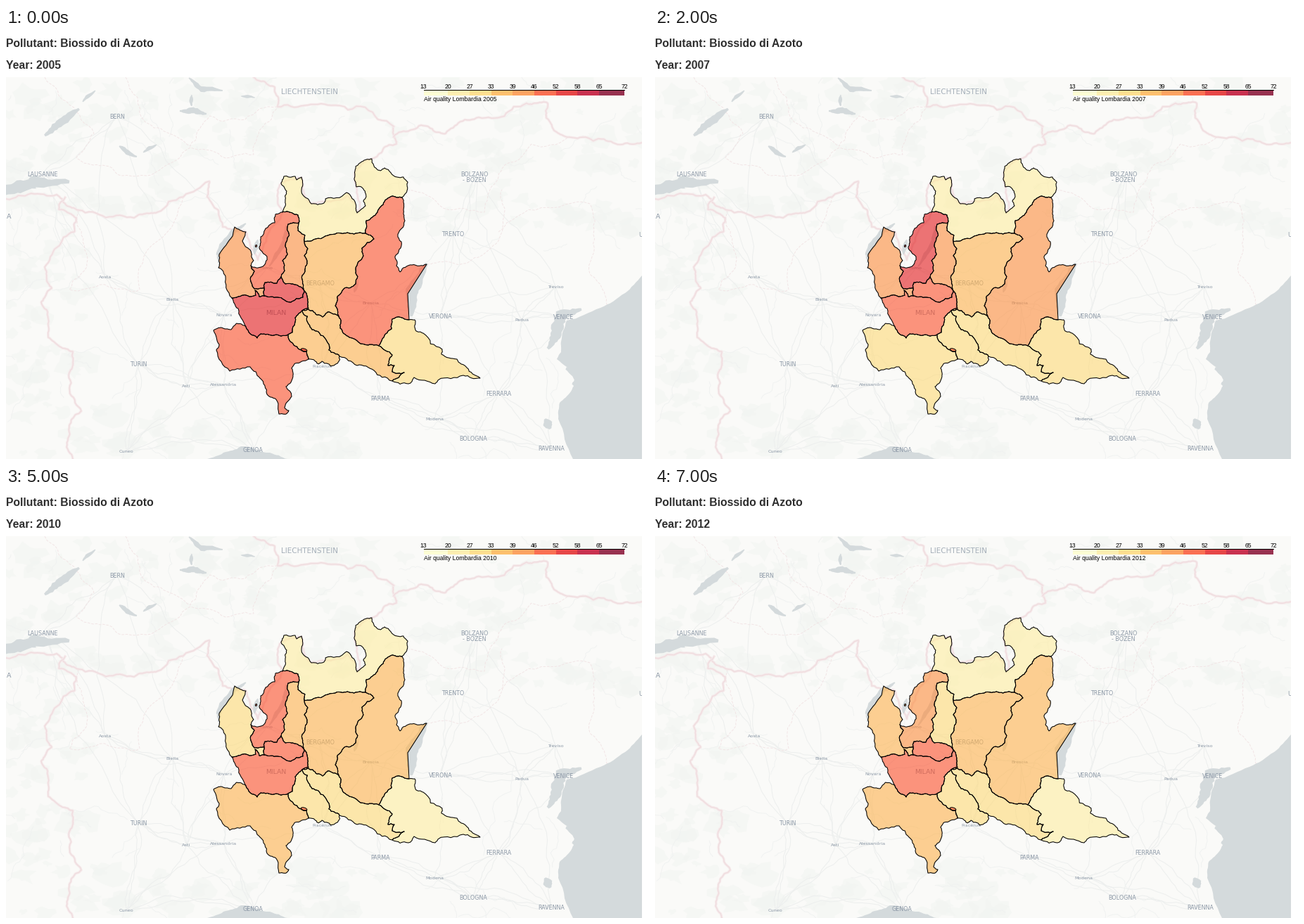
These frames come from a looping animation (914x613 px, 8 s). A matplotlib script:

```python
import numpy as np
import matplotlib.pyplot as plt
from matplotlib.animation import FuncAnimation
from matplotlib.patches import Ellipse, Polygon, Rectangle

W, H, TOP, RIGHT = 914, 613, 70, 904
PT = 0.72  # points per pixel at 100 dpi
WATER, BORDER, ROAD, LABEL = "#d4dadc", "#efdcde", "#edefee", "#8e9aa8"
YLORRD = ["#ffffcc", "#ffeda0", "#fed976", "#feb24c", "#fd8d3c",
          "#fc4e2a", "#e31a1c", "#bd0026", "#800026"]
rng = np.random.default_rng(12)

fig = plt.figure(figsize=(9.14, 6.13), dpi=100, facecolor="white")
ax = fig.add_axes([0, 0, RIGHT / W, (H - TOP) / H])
ax.set(xlim=(0, RIGHT), ylim=(H, TOP), xticks=[], yticks=[], facecolor="#fafaf8")
for side in ax.spines.values():
    side.set_visible(False)


def arc(*pts, amp=0.14, passes=3):
    """Polyline made ragged by midpoint displacement."""
    p = np.array(pts, float)
    for _ in range(passes):
        step = np.diff(p, axis=0)
        normal = np.column_stack([-step[:, 1], step[:, 0]])
        mid = p[:-1] + step / 2 + normal * rng.uniform(-amp, amp, (len(step), 1))
        out = np.empty((2 * len(p) - 1, 2))
        out[::2], out[1::2] = p, mid
        p = out
    return p


def back(a):
    return a[::-1]


def area(pts, color, z=1, **kw):
    return ax.add_patch(Polygon(pts, closed=True, fc=color, zorder=z, **kw))


def line(pts, color, width, z=2, **kw):
    ax.plot(pts[:, 0], pts[:, 1], color=color, lw=width * PT, zorder=z, **kw)


def label(x, y, text, size=8.0, **kw):
    style = dict(color=LABEL, family="DejaVu Sans", ha="center",
                 va="center_baseline", zorder=4, clip_on=True)
    style.update(kw)
    return ax.text(x, y, text, fontsize=size * PT, **style)


# ---- place names ----
cities = [(158, 126, "BERN"), (52, 207.5, "LAUSANNE"), (665.5, 208, "BOLZANO"),
          (635.5, 293, "TRENTO"), (618, 410, "VERONA"), (793, 410.5, "VENICE"),
          (188, 478, "TURIN"), (532, 527, "PARMA"), (700, 520, "FERRARA"),
          (664, 583.5, "BOLOGNA"), (775.5, 597.5, "RAVENNA"), (351, 599.5, "GENOA"),
          (446.5, 362.5, "BERGAMO")]
towns = [(141, 354, "Aosta"), (236.5, 386, "Biella"), (310, 408, "Novara"),
         (256.5, 509, "Asti"), (309.5, 507, "Alessandria"), (171, 602.5, "Cuneo"),
         (781, 368, "Treviso"), (733, 415.5, "Padua"), (609.5, 556, "Modena"),
         (449.5, 481, "Piacenza"), (370, 341, "Como"), (518, 391, "Brescia")]
for place in cities:
    label(*place)
for place in towns:
    label(*place, 6.5)
label(665.5, 216, "- BOZEN")
label(384, 404.5, "MILAN", 9.4)
label(431, 90, "LIECHTENSTEIN", 10.4, color="#a5afb9")
label(4, 267.5, "A", 9.5)
label(902, 293.5, "U")


# ---- relief and roads ----
def relief(x0, x1, y0, y1, n):
    a = np.linspace(0, 2 * np.pi, 14)[:-1]
    for _ in range(n):
        x, y = rng.uniform(x0, x1), rng.uniform(y0, y1)
        r = rng.uniform(4, 17) * rng.uniform(0.5, 1.3, a.size)
        shape = np.column_stack([x + r * np.cos(a) * 1.4, y + r * np.sin(a)])
        area(shape, "#f2f5f2", alpha=0.55, lw=0)


relief(0, 904, 70, 290, 190)
relief(0, 130, 290, 613, 45)
relief(130, 540, 540, 613, 45)

hubs = np.array([p[:2] for p in cities + towns])
for a in hubs:
    for j in np.argsort(np.hypot(*(hubs - a).T))[1:5]:
        line(arc(a, hubs[j], amp=0.1, passes=4), ROAD, 1)
for _ in range(95):
    a = rng.uniform((0, 70), (900, 613))
    if a[0] < 770 or a[1] < 340:
        line(arc(a, a + rng.normal(0, 42, 2), amp=0.2, passes=4), "#f0f2f1", 0.9)


# ---- state and region borders ----
def border(*pts):
    b = arc(*pts, passes=4)
    line(b, "#f6eaeb", 3.5)
    line(b, BORDER, 1.2)


def region(*pts):
    line(arc(*pts, passes=4), "#f2e4e5", 0.9, dashes=(4, 2))


border((0, 243), (72, 237), (103, 259), (182, 270), (215, 262), (289, 218),
       (286, 240), (308, 283), (341, 290), (358, 330), (393, 262), (391, 221),
       (420, 213), (434, 250), (486, 236), (500, 263), (496, 205), (520, 186),
       (555, 165), (551, 140))
border((84, 241), (75, 258), (100, 270), (97, 290), (55, 340), (65, 370), (50, 390),
       (60, 440), (95, 460), (90, 490), (107, 545), (90, 565), (95, 613))
border((551, 155), (600, 140), (625, 150), (672, 127), (740, 107), (770, 107),
       (768, 128), (790, 152), (850, 158), (904, 163))
border((352, 70), (382, 84), (386, 112), (462, 110), (551, 140))
region((55, 70), (125, 150), (100, 185), (165, 210), (262, 170), (352, 180), (386, 112))
region((170, 70), (195, 130), (262, 168), (290, 125), (386, 112))
region((570, 231), (680, 262), (705, 200), (800, 155))
region((598, 336), (650, 335), (705, 290), (705, 230))
region((700, 290), (830, 250), (830, 350), (855, 395))
region((103, 259), (115, 340), (90, 372), (190, 372), (252, 240))


# ---- water ----
def lake(width, *pts):
    """Lake as a ragged ribbon that narrows towards its ends."""
    p = arc(*pts, amp=0.06)
    d = np.gradient(p, axis=0)
    n = np.column_stack([-d[:, 1], d[:, 0]]) / np.hypot(*d.T)[:, None]
    t = np.linspace(0, np.pi, len(p))
    half = width / 2 * (0.25 + 0.75 * np.sin(t)) * rng.uniform(0.8, 1.2, len(p))
    area(np.vstack([p + n * half[:, None], back(p - n * half[:, None])]),
         WATER, z=3, lw=0)


lake(17, (-20, 234), (10, 229), (42, 218), (90, 219))
lake(11, (55, 153), (78, 134), (104, 115))
lake(5, (109, 105), (127, 89))
lake(7, (161, 168), (186, 183))
lake(5, (195, 177), (214, 166))
lake(8, (247, 118), (266, 117), (285, 122))
lake(5, (264, 95), (264, 111))
lake(7, (260, 71), (278, 87), (308, 89))
lake(4, (334, 97), (354, 99))
lake(8, (341, 278), (324, 288), (303, 318), (302, 334))
lake(6, (358, 301), (353, 322))
lake(7, (398, 281), (396, 305), (374, 339))
lake(5, (500, 358), (495, 376))
lake(17, (598, 335), (577, 374), (576, 410))
lake(16, (818, 400), (788, 409), (782, 435), (770, 456))
lake(15, (796, 484), (820, 499), (806, 508))
lake(12, (766, 556), (774, 570))

sea = arc((904, 352), (880, 377), (845, 398), (797, 416), (789, 446), (789, 461),
          (783, 471), (813, 494), (803, 517), (787, 533), (785, 556), (806, 613), amp=0.06)
area(np.vstack([sea, (904, 613)]), WATER, z=3, lw=0)
area(arc((286, 613), (309, 604), (334, 595), (375, 604), (400, 613), amp=0.08),
     WATER, z=3, lw=0)

# ---- province borders, one arc per shared stretch ----
so_out = arc((393, 262), (397, 246), (399, 232), (391, 221), (395, 211), (411, 211),
             (413, 216), (420, 212), (420, 232), (434, 250), (452, 249), (454, 243),
             (484, 234), (490, 239), (497, 250), (499, 263), (511, 253), (508, 246),
             (512, 240), (505, 226), (498, 226), (495, 214), (497, 197), (506, 190),
             (520, 186), (523, 196), (532, 203), (538, 199), (556, 212), (565, 212),
             (571, 219), (570, 231), (563, 241))
so_bs = arc((563, 241), (550, 239), (538, 247), (528, 262), (512, 274), (511, 292))
so_bg = arc((511, 292), (495, 293), (485, 291), (468, 293), (440, 300), (424, 303))
so_lc = arc((424, 303), (425, 295), (415, 288), (416, 277))
so_co = arc((416, 277), (415, 266), (400, 261), (393, 262))
bs_east = arc((563, 241), (565, 259), (567, 274), (557, 297), (562, 304), (553, 325),
              (555, 338), (560, 347), (577, 337), (598, 336))
bs_lake = arc((598, 336), (571, 378), (573, 415), amp=0)
bs_mn = arc((573, 415), (549, 414), (548, 428), (537, 440), (530, 452))
bs_cr = arc((530, 452), (515, 451), (488, 440), (475, 427), (473, 410))
bs_bg = arc((473, 410), (468, 395), (471, 382), (480, 371), (497, 364), (497, 343),
            (508, 324), (506, 313), (523, 300), (511, 292))
bg_lc = arc((424, 303), (429, 314), (424, 324), (428, 335), (421, 352), (424, 374))
bg_mi = arc((424, 374), (428, 381), (430, 399), (421, 402))
bg_cr = arc((421, 402), (436, 402), (450, 411), (457, 404), (473, 410))
lc_co = arc((416, 277), (401, 279), (397, 310), (400, 322), (393, 331), (396, 345), (391, 354))
lc_mb = arc((391, 354), (397, 364), (411, 365), (424, 374))
co_west = arc((393, 262), (383, 265), (382, 277), (369, 285), (362, 297), (360, 313),
              (371, 325), (363, 340), (348, 338))
co_va = arc((348, 338), (353, 346), (348, 354), (353, 371), (367, 370))
co_mb = arc((367, 370), (368, 362), (385, 363), (391, 354))
va_east = arc((325, 283), (341, 290), (336, 303), (345, 314), (352, 331), (348, 338))
va_lake = arc((325, 283), (322, 296), (303, 322), amp=0.03)
va_west = arc((303, 322), (302, 341), (312, 353), (321, 384))
va_mi = arc((321, 384), (337, 380), (355, 380), (354, 373), (360, 382), (367, 381))
va_mb = arc((367, 381), (367, 370))
mb_mi = arc((367, 381), (386, 383), (405, 390), (422, 383), (424, 374))
mi_west = arc((321, 384), (330, 399), (341, 425))
mi_pv = arc((341, 425), (357, 441), (362, 435), (381, 437), (401, 436))
mi_lo = arc((401, 436), (407, 433), (411, 412), (421, 402))
lo_pv = arc((401, 436), (409, 451), (427, 460), (430, 471))
lo_south = arc((430, 471), (442, 477), (449, 474), (466, 480), (474, 467), amp=0.25)
lo_cr = arc((421, 402), (430, 421), (444, 432), (459, 450), (459, 458), (474, 467), amp=0.2)
cr_south = arc((474, 467), (499, 480), (523, 487), (549, 502), amp=0.18)
cr_mn = arc((530, 452), (549, 465), (543, 480), (552, 480), (549, 489), (566, 490), (549, 502))
mn_east = arc((573, 415), (581, 415), (583, 431), (593, 434), (620, 457), (619, 464),
              (641, 471), (655, 483), (674, 498), (650, 494), (614, 501), (610, 506),
              (580, 497), (572, 506), (549, 502))
pv_out = arc((430, 471), (411, 477), (406, 484), (408, 495), (398, 510), (406, 524),
             (396, 540), (402, 544), (398, 549), (388, 549), (385, 530), (371, 521),
             (361, 498), (347, 482), (318, 488), (299, 458), (303, 450), (295, 430),
             (305, 426), (320, 429), (328, 420), (341, 425))

# Rings with their colour class for 2005 to 2012
provinces = [
    ("11112111", [so_out, so_bs, so_bg, so_lc, so_co]),
    ("44443233", [va_east, co_va, back(va_mb), back(va_mi), back(va_west), back(va_lake)]),
    ("56666554", [co_west, co_va, co_mb, back(lc_co), so_co]),
    ("44444332", [so_lc, lc_co, lc_mb, back(bg_lc)]),
    ("66555555", [co_mb, lc_mb, back(mb_mi), va_mb]),
    ("66555555", [va_mi, mb_mi, bg_mi, back(mi_lo), back(mi_pv), back(mi_west)]),
    ("33333333", [so_bg, bg_lc, bg_mi, bg_cr, bs_bg]),
    ("55433333", [bs_east, bs_lake, bs_mn, bs_cr, bs_bg, back(so_bs)]),
    ("33222222", [bg_cr, back(bs_cr), cr_mn, back(cr_south), back(lo_cr)]),
    ("33222222", [mi_lo, lo_cr, back(lo_south), back(lo_pv)]),
    ("22222111", [mn_east, back(cr_mn), back(bs_mn)]),
    ("54233333", [mi_pv, lo_pv, pv_out]),
]
# The 2009 class is the fifth digit of each string
fills = []
for classes, ring in provinces:
    pts = np.vstack(ring)
    fills.append((classes, area(pts, "w", z=5, alpha=0.6, lw=0)))
    area(pts, "none", z=6, ec="black", lw=1.05 * PT, joinstyle="round")
for classes, x, y, w, h in [("66555555", 423.5, 458, 9, 4), ("56666554", 355.5, 310, 2, 3)]:
    dot = Ellipse((x, y), w, h, angle=15, zorder=5, alpha=0.6, lw=0)
    fills.append((classes, ax.add_patch(dot)))
    ax.add_patch(Ellipse((x, y), w, h, angle=15, zorder=6, fc="none", ec="black", lw=PT))

# ---- legend ----
ticks = [13, 20, 27, 33, 39, 46, 52, 58, 65, 72]
stops = [593.5, *(628.2 + 30.7 * np.arange(8)), 879]
sans = dict(family="Liberation Sans", color="black", va="baseline", zorder=8)
for x0, x1, color in zip(stops, stops[1:], YLORRD):
    ax.add_patch(Rectangle((x0, 88), x1 - x0, 8, fc=color, alpha=0.8, lw=0, zorder=7))
ax.plot([stops[0], stops[-1]], [88.5, 88.5], color="black", lw=PT, zorder=8)
for x, t in zip(stops, ticks):
    label(x, 86, str(t), 8.7, **sans)
caption = label(593.5, 104, "", 8.6, **{**sans, "ha": "left"})

# ---- headings ----
head = dict(family="Liberation Sans", weight="bold", color="#2e2e2e",
            fontsize=15.7 * PT, va="baseline")
fig.text(0, 1 - 27 / H, "Pollutant: Biossido di Azoto", **head)
heading = fig.text(0, 1 - 58.5 / H, "", **head)


def draw(i):
    year = 2005 + i
    heading.set_text(f"Year: {year}")
    caption.set_text(f"Air quality Lombardia {year}")
    for classes, patch in fills:
        patch.set_facecolor(YLORRD[int(classes[i])])
    return [heading, caption] + [p for _, p in fills]


anim = FuncAnimation(fig, draw, frames=8, interval=1000, repeat=True,
                     repeat_delay=0, blit=False)
plt.show()
```
